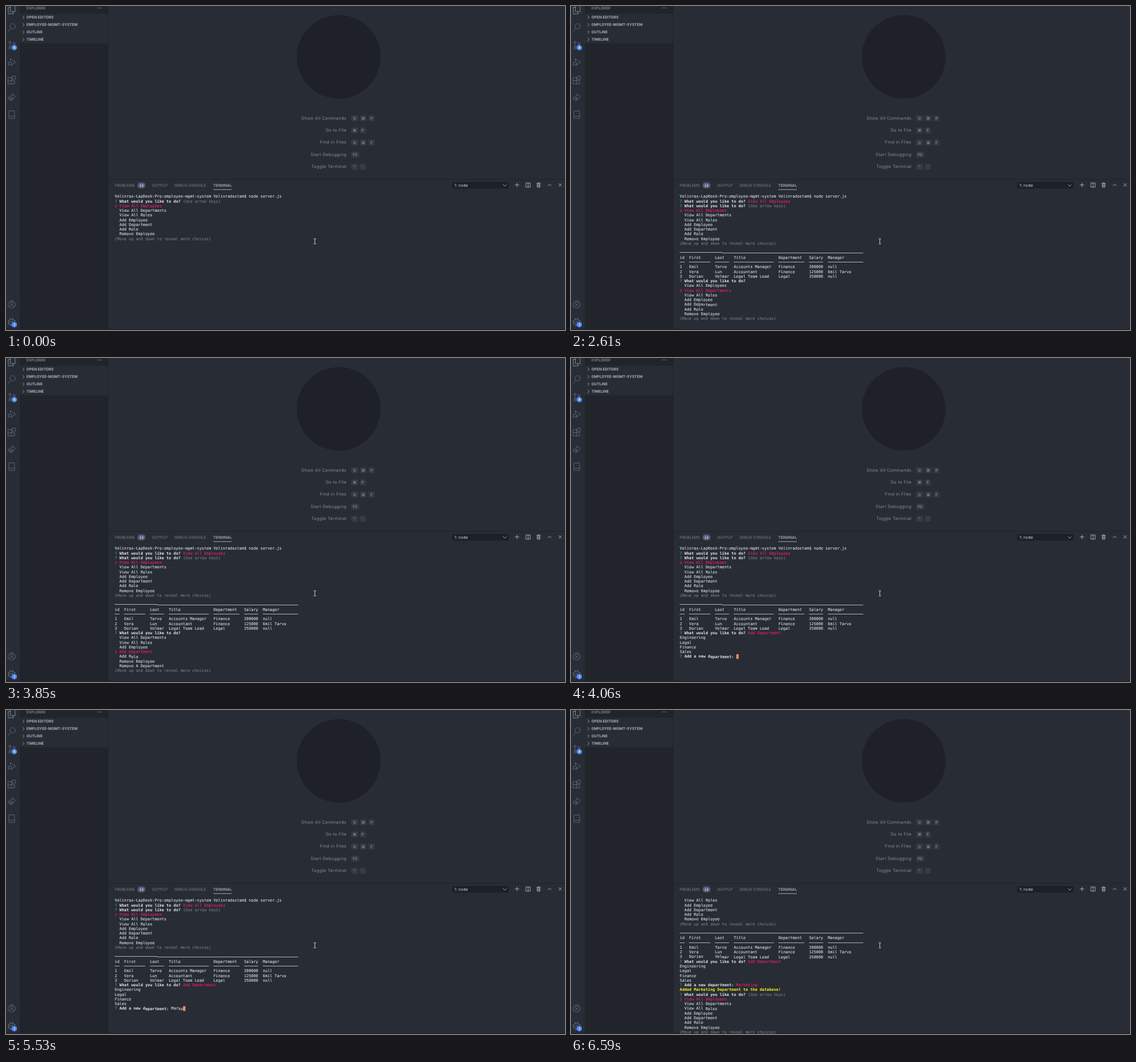
An HTML page for the animation above (8000 ms loop, 982 by 570 pixels).

```html
<!DOCTYPE html>
<html lang="en">
<head>
<meta charset="utf-8">
<title>Employee management terminal</title>
<style>
  html, body { margin: 0; width: 100%; height: 100%; overflow: hidden; background: #282c34; }
  svg { display: block; }
  /* the tiny turn keeps baselines from snapping to whole pixels */
  text { white-space: pre; text-rendering: geometricPrecision;
    transform: rotate(.02deg); transform-box: fill-box; transform-origin: center; }
  .ui { font-family: Inter, sans-serif; font-size: 6.5px; fill: #7f8590; }
  .section { font-weight: 700; fill: #a9afba; }
  .bright { fill: #d7dae0; }
  .hint { font-family: Inter, sans-serif; font-size: 7.6px; letter-spacing: .3px; fill: #888b91; text-anchor: end; }
  .key { font-family: Inter, "DejaVu Sans", sans-serif; font-size: 6.3px; fill: #a4a7ac; text-anchor: middle; }
  .badge { font-family: Inter, sans-serif; font-size: 5.6px; font-weight: 600; fill: #fff; text-anchor: middle; }
  .line { fill: none; stroke-linecap: round; stroke-linejoin: round; }
  #term { font-family: "DejaVu Sans Mono", monospace; font-size: 6.877px; color: #d2d6dc; }
  #term text { fill: currentColor; stroke: currentColor; stroke-width: .14px; }
  .ask { font-weight: 700; color: #e4e6ea; }
  .dim { color: #747983; }
  .pick { color: #f01c68; }
  .mark { color: #2fae3c; }
  .done { color: #f4f41c; font-weight: 700; }
  #term .ask, #term .done { stroke: none; }
</style>
</head>
<body>
<svg id="stage" width="982" height="570" viewBox="0 0 982 570">
  <rect width="982" height="570" fill="#282c34"/>
  <rect x="24" width="156" height="570" fill="#21252b"/>
  <rect x="24" y="13.5" width="156" height="52.2" fill="#282c34"/>
  <rect x="179.4" width=".6" height="568" fill="#1b1e23"/>
  <rect x="180" y="304.5" width="802" height=".8" fill="#1d2026"/>
  <rect y="568" width="982" height="2" fill="#21252b"/>
  <circle cx="584.5" cy="89.5" r="73.5" fill="#1e2128"/>

  <!-- activity bar -->
  <g class="line" stroke="#5f6b88" stroke-width=".9">
    <path stroke="#8a94ab" d="M8 -1.5H13L16 1.5V10H8ZM8 2.5H4V14H12.5V10"/>
    <circle cx="11.6" cy="35.8" r="4.8"/><path d="M8.2 39.4L3.8 44.6"/>
    <circle cx="6.8" cy="64" r="2"/><circle cx="13.8" cy="66" r="2"/><circle cx="6.8" cy="74" r="2"/>
    <path d="M6.8 66V72M13.8 68C13.8 71 7 69.5 6.8 72"/>
    <path d="M7.5 97V93L16.5 99L10.5 103.3"/><circle cx="7" cy="101.5" r="2.9"/>
    <path d="M3.3 99.5H4.2M3.3 104.5L4.7 103.4M10.7 104.5L9.3 103.4"/>
    <path d="M4 126H9.6V137H4ZM4 131.4H15.2V137H9.6M11.4 123.5H16.5V128.8H11.4Z"/>
    <path d="M3.6 164C3.8 160 6.6 157.9 11 157.9V154.3L16.8 159.5L11 164.7V161.2C7.5 161.1 5.5 161.8 3.6 164Z"/>
    <circle cx="8.6" cy="165" r="1.8"/>
    <path d="M5.5 184.5H15V197.8H5.5ZM5.5 194H15"/>
    <circle cx="10" cy="525" r="6.5"/><circle cx="10" cy="522.8" r="2.5"/>
    <path d="M5.5 529.5C6.5 525.7 13.5 525.7 14.5 529.5"/>
    <circle cx="10" cy="556" r="4.9"/><circle cx="10" cy="556" r="2"/>
    <circle cx="10" cy="556" r="6.1" stroke-width="1.6" stroke-linecap="butt" stroke-dasharray="2.4 2.39"/>
  </g>
  <circle cx="14.6" cy="73.2" r="4.7" fill="#528bff"/>
  <text id="count" class="badge" x="14.6" y="75.2">4</text>
  <g id="clock" class="line" stroke="#fff" stroke-width=".7" visibility="hidden">
    <circle cx="14.6" cy="73.2" r="2.6"/><path d="M14.6 71.6V73.3H16"/>
  </g>
  <circle cx="14.6" cy="560.6" r="4.7" fill="#528bff"/>
  <text class="badge" x="14.6" y="562.6">1</text>

  <!-- sidebar -->
  <text class="ui" x="36" y="5.9" style="fill:#a3a9b4">EXPLORER</text>
  <g fill="#a3a9b4"><circle cx="161" cy="3.4" r=".6"/><circle cx="163.8" cy="3.4" r=".6"/><circle cx="166.6" cy="3.4" r=".6"/></g>
  <g id="sections"></g>

  <g id="hints"></g>

  <!-- panel header -->
  <text class="ui" x="191" y="317.9">PROBLEMS</text>
  <rect x="231" y="310.2" width="14" height="10.6" rx="5.3" fill="#515a78"/>
  <text class="badge" x="238" y="317.7" style="font-weight:400;font-size:6.2px">24</text>
  <text class="ui" x="257" y="317.9">OUTPUT</text>
  <text class="ui" x="296" y="317.9">DEBUG CONSOLE</text>
  <text class="ui bright" x="364" y="317.9">TERMINAL</text>
  <rect x="364" y="322.6" width="32.5" height=".8" fill="#c5c9d0"/>
  <rect x="783.5" y="309.8" width="99.5" height="11.4" rx=".8" fill="#1d2026"/>
  <text class="ui bright" x="788" y="317.9" style="font-size:7px">1: node</text>
  <g class="line" stroke="#c5c9d0" stroke-width=".8">
    <path d="M873.3 314.3L876 317L878.7 314.3"/>
    <path d="M894.2 314.8H901.2M897.7 311.3V318.3"/>
    <path d="M913.6 311.3H920.8V318.7H913.6ZM917.2 311.3V318.7"/>
    <path d="M932.4 312.2H938.8M934.5 312V311H936.7V312M933.2 312.4V318.8H938V312.4M934.8 314V317.3M936.4 314V317.3"/>
    <path d="M952.2 316.2L954.9 313.4L957.6 316.2"/>
    <path d="M971 312.3L976 317.3M976 312.3L971 317.3"/>
  </g>

  <g id="term"></g>
  <path class="line" stroke="#e6e6e6" stroke-width=".9" d="M540.8 409.3Q542.5 409.3 542.5 410.6V417.4Q542.5 418.7 540.8 418.7M544.2 409.3Q542.5 409.3 542.5 410.6M542.5 417.4Q542.5 418.7 544.2 418.7"/>
</svg>
<script>
const LOOP = 8000, LEFT = 191, TOP = 330.9, COL = 4.14, ROW = 8.27, BASELINE = 6.4;
const $ = id => document.getElementById(id);

// Static lists
$('sections').innerHTML = ['OPEN EDITORS', 'EMPLOYEE-MGMT-SYSTEM', 'OUTLINE', 'TIMELINE'].map((name, i) => {
  const y = 20 + i * 13;
  return `<path class="line" stroke="#a3a9b4" stroke-width=".8" d="M29.3 ${y - 2.6}L32 ${y}L29.3 ${y + 2.6}"/>
    <text class="ui section" x="36" y="${y + 2.3}">${name}</text>`;
}).join('');

$('hints').innerHTML = [
  ['Show All Commands', '⇧', '⌘', 'P'],
  ['Go to File', '⌘', 'P'],
  ['Find in Files', '⇧', '⌘', 'F'],
  ['Start Debugging', 'F5'],
  ['Toggle Terminal', '^', '`']
].map(([label, ...keys], i) => {
  const y = 197 + i * 21.3;
  let x = 606.2;
  const caps = keys.map(k => {
    const w = k === 'F5' ? 14 : 'PF`'.includes(k) ? 10.4 : 12.2;
    const cap = `<rect x="${x}" y="${y - 4.7}" width="${w}" height="10.6" rx="1.6" fill="#373a41" stroke="#2f3238" stroke-width=".5"/>
      <text class="key" x="${x + w / 2}" y="${y + 3}">${k}</text>`;
    x += w + 3.2;
    return cap;
  }).join('');
  return `<text class="hint" x="598.2" y="${y + 2.7}">${label}</text>${caps}`;
}).join('');

// A terminal line is a list of [text, class] runs
const plain = s => [[s]];
const ask = (q, ...rest) => [['?', 'mark'], [' '], [q, 'ask'], [' '], ...rest];
const todo = (...rest) => ask('What would you like to do?', ...rest);
const arrows = ['(Use arrow keys)', 'dim'];
const choices = ['View All Employees', 'View All Departments', 'View All Roles', 'Add Employee',
  'Add Department', 'Add Role', 'Remove Employee', 'Remove A Department'];
const menu = (selected, first = 0) => [
  ...choices.slice(first, first + 7).map((c, i) =>
    i + first === selected ? [['❯', 'pick'], [' '], [c, 'pick']] : [['  '], [c]]),
  [['(Move up and down to reveal more choices)', 'dim']]
];

const widths = [2, 9, 6, 17, 11, 6, 15];
const tableRow = cells => plain(cells.map((c, i) => c.padEnd(widths[i])).join('  '));
const staff = `Emil,Tarvo,Accounts Manager,Finance,200000,null
Vera,Lun,Accountant,Finance,125000,Emil Tarvo
Dorian,Velmar,Legal Team Lead,Legal,250000,null
Odette,Sol,Lawyer,Legal,190000,Dorian Velmar
Rosalind,Brenko,Lead Engineer,Engineering,150000,null
Nell,Tolvik,Software Engineer,Engineering,120000,Rosalind Brenko
Leopold,Dunn,Sales Lead,Sales,100000,null
Fabian,Varek,Salesperson,Sales,80000,Leopold Dunn
Casper,Pelth,Accounts Manager,Finance,200000,null
Cornelius,Ostel,Accountant,Finance,125000,Casper Pelth`
  .split('\n').map((r, i) => tableRow([String(i + 1), ...r.split(',')]));

const prompt = plain('Velinras-LapDesk-Pro:employee-mgmt-system Velinradostam$ node server.js');
const start = [prompt, todo(arrows), ...menu(0)];
const head = [
  prompt, todo(['View All Employees', 'pick']), todo(arrows), ...menu(0), plain(''),
  plain('─'.repeat(78)),
  tableRow(['id', 'First', 'Last', 'Title', 'Department', 'Salary', 'Manager']),
  tableRow(widths.map(w => '─'.repeat(w)))
];
const top3 = [...head, ...staff.slice(0, 3)];
const choose = (selected, first) => [...top3, todo(), ...menu(selected, first)];
const form = [...top3, todo(['Add Department', 'pick']),
  ...['Engineering', 'Legal', 'Finance', 'Sales'].map(plain)];
const newDept = 'Add a new department:';
const typed = n => [...form, ask(newDept, ['Marketing'.slice(0, n)], ['', 'cursor'])];
const added = [...form, ask(newDept, ['Marketing', 'pick']),
  [['Added Marketing Department to the database!', 'done']], todo(arrows), ...menu(0)].slice(5);

const steps = [
  [0, start], [360, [...head, ...staff]],
  [2610, choose(1)], [2960, choose(2)], [3290, choose(3)], [3640, choose(4, 1)],
  [4060, typed(0)], [4960, typed(1)], [5140, typed(2)], [5320, typed(3)], [5530, typed(5)],
  [5700, typed(6)], [6050, typed(7)], [6230, typed(9)], [6590, added]
];

function lineMarkup(runs, row) {
  let col = 0;
  return runs.map(([text, cls = '']) => {
    const x = LEFT + col * COL, y = TOP + row * ROW;
    col += text.length;
    if (cls === 'cursor') return `<rect x="${x}" y="${y}" width="${COL}" height="${ROW}" fill="#f38b6e"/>`;
    return text.trim() && `<text class="${cls}" x="${x}" y="${y + BASELINE}">${text}</text>`;
  }).join('');
}

const screens = steps.map(([, lines]) => lines.map(lineMarkup).join(''));
let shown = -1;
function draw() {
  const t = performance.now() % LOOP;
  const i = steps.findLastIndex(([at]) => at <= t);
  if (i !== shown) $('term').innerHTML = screens[shown = i];
  const busy = t >= 3640 && t < 3850;
  $('count').setAttribute('visibility', busy ? 'hidden' : 'visible');
  $('clock').setAttribute('visibility', busy ? 'visible' : 'hidden');
  requestAnimationFrame(draw);
}
draw();
</script>
</body>
</html>
```
